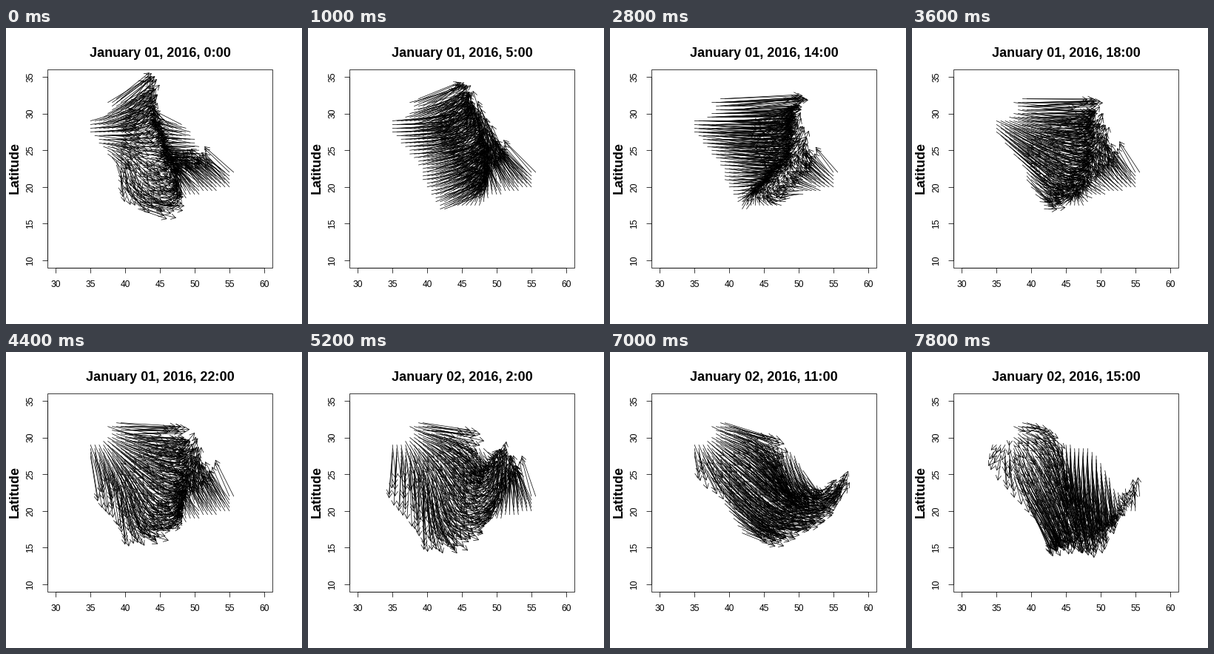
A matplotlib script that plays this animation: 400x400 px, repeating every 8000 ms.

```python
import numpy as np
import matplotlib.pyplot as plt
from matplotlib.animation import FuncAnimation
from matplotlib.collections import LineCollection
from matplotlib.patches import Rectangle
from matplotlib.path import Path

SIZE, DPI = 400, 100
HOURS, STEP_MS = 40, 200
LEFT, RIGHT, TOP, BOTTOM = 56, 360, 56, 324
HEAD, SPREAD = 7.2, np.radians(30)
PX = 72 / DPI


def to_px(lon, lat):
    x = LEFT + (lon - 28.8) * (RIGHT - LEFT) / 32.4
    y = BOTTOM - (lat - 9) * (BOTTOM - TOP) / 27
    return x, y


# Rough land outline as (longitude, latitude)
OUTLINE = [
    (34.6, 28.0), (34.9, 29.2), (36.5, 29.4), (38.0, 30.5), (37.0, 31.55),
    (39.2, 32.15), (42.0, 31.1), (44.7, 29.2), (48.4, 28.6), (50.1, 26.7),
    (51.5, 24.5), (52.0, 23.0), (55.8, 22.2), (55.1, 19.9), (49.1, 18.6),
    (47.6, 17.4), (41.7, 16.9), (39.1, 21.0), (38.9, 22.8), (37.2, 24.6),
]


def grid_points():
    lon, lat = np.meshgrid(np.arange(34.375, 56.5, 0.625),
                           np.arange(16.5, 32.6, 0.5))
    pts = np.column_stack([lon.ravel(), lat.ravel()])
    pts = pts[Path(OUTLINE).contains_points(pts)]
    return np.column_stack(to_px(pts[:, 0], pts[:, 1]))


# Key places: north, west, coast, south, middle, north-east, gulf, east,
# south-east
PLACES = np.array([(160, 100), (118, 130), (155, 192), (198, 238), (190, 165),
                   (228, 128), (258, 165), (303, 205), (250, 228)], float)

# Wind in pixels at each key place, by hour
WINDS = {
    0: [(42, -38), (52, -10), (-2, 34), (42, 2), (30, 2),
        (-34, -14), (-42, 4), (-31, -33), (-22, -36)],
    9: [(60, -18), (75, 5), (85, -45), (42, -48), (62, -32),
        (2, -65), (14, -40), (-44, -46), (0, -38)],
    14: [(105, -8), (80, 5), (60, 8), (0, -22), (55, 3),
         (14, -22), (6, -14), (-30, -30), (-25, 5)],
    22: [(78, -3), (12, 55), (3, 62), (40, -8), (42, 22),
         (18, -10), (0, -25), (-26, -42), (-17, -30)],
    30: [(60, 8), (-18, 45), (-4, 75), (30, 25), (0, 40),
         (8, 78), (10, -50), (-14, -55), (50, -58)],
    35: [(72, 14), (4, 30), (48, 50), (45, 12), (34, 28),
         (16, 65), (18, 32), (16, -38), (50, -8)],
    39: [(32, 5), (-12, 12), (36, 65), (8, 24), (18, 45),
         (-6, 70), (10, 72), (-2, -32), (5, 45)],
}


def spread_matrix(pts):
    """Weights that carry values at PLACES smoothly to pts."""
    n = len(PLACES)

    def terms(p):
        dist = np.linalg.norm(p[:, None] - PLACES[None], axis=2)
        return np.hstack([dist, np.ones((len(p), 1)), p]) / SIZE

    system = np.zeros((n + 3, n + 3))
    system[:n] = terms(PLACES)
    system[n:, :n] = system[:n, n:].T
    return terms(pts) @ np.linalg.inv(system)[:, :n]


tails = grid_points()
spread = spread_matrix(tails)
wobble = np.random.default_rng(4).normal(0, 2.5, tails.shape)
hours = np.array(list(WINDS))
vectors = np.array(list(WINDS.values()), float)


def wind_at(hour):
    i = min(np.searchsorted(hours, hour, side="right"), len(hours) - 1)
    t = (hour - hours[i - 1]) / (hours[i] - hours[i - 1])
    return spread @ (vectors[i - 1] * (1 - t) + vectors[i] * t) + wobble


def arrow_lines(d):
    """Shaft and open head of every arrow."""
    tips = tails + d
    ang = np.arctan2(d[:, 1], d[:, 0])

    def barb(a):
        return tips - HEAD * np.column_stack([np.cos(a), np.sin(a)])

    shafts = np.stack([tails, tips], axis=1)
    heads = np.stack([barb(ang - SPREAD), tips, barb(ang + SPREAD)], axis=1)
    return list(shafts) + list(heads)


plt.rcParams["font.family"] = "Liberation Sans"
fig = plt.figure(figsize=(SIZE / DPI, SIZE / DPI), dpi=DPI, facecolor="white")
ax = fig.add_axes([0, 0, 1, 1])
ax.set_xlim(0, SIZE)
ax.set_ylim(SIZE, 0)
ax.axis("off")


def line(xs, ys):
    ax.plot(xs, ys, color="black", lw=0.75 * PX, solid_capstyle="butt")


def label(x, y, s, px, **kw):
    return ax.text(x, y, s, fontsize=px * PX, ha="center", **kw)


frame = Rectangle((LEFT, TOP), RIGHT - LEFT, BOTTOM - TOP, fill=False,
                  ec="black", lw=0.75 * PX)
ax.add_patch(frame)

for lon in range(30, 61, 5):
    x, _ = to_px(lon, 0)
    line([x, x], [BOTTOM, BOTTOM + 7])
    label(x, 350, str(lon), 12, va="baseline")
for lat in range(10, 36, 5):
    _, y = to_px(0, lat)
    line([LEFT - 7, LEFT], [y, y])
    label(33.5, y, str(lat), 12, va="center", rotation=90)
line([to_px(30, 0)[0], to_px(60, 0)[0]], [BOTTOM, BOTTOM])
line([LEFT, LEFT], [to_px(0, 10)[1], to_px(0, 35)[1]])

label(12, 188.5, "Latitude", 18, va="center", rotation=90, weight="bold")
title = label(208, 39, "", 18, va="baseline", weight="bold")

arrows = LineCollection([], colors="black", linewidths=0.7 * PX,
                        capstyle="round", joinstyle="round")
ax.add_collection(arrows, autolim=False)
arrows.set_clip_path(frame)


def draw(hour):
    arrows.set_segments(arrow_lines(wind_at(hour)))
    title.set_text(f"January {1 + hour // 24:02d}, 2016, {hour % 24}:00")
    return arrows, title


anim = FuncAnimation(fig, draw, frames=HOURS, interval=STEP_MS,
                     init_func=lambda: draw(0), repeat=True, repeat_delay=0)
plt.show()
```
